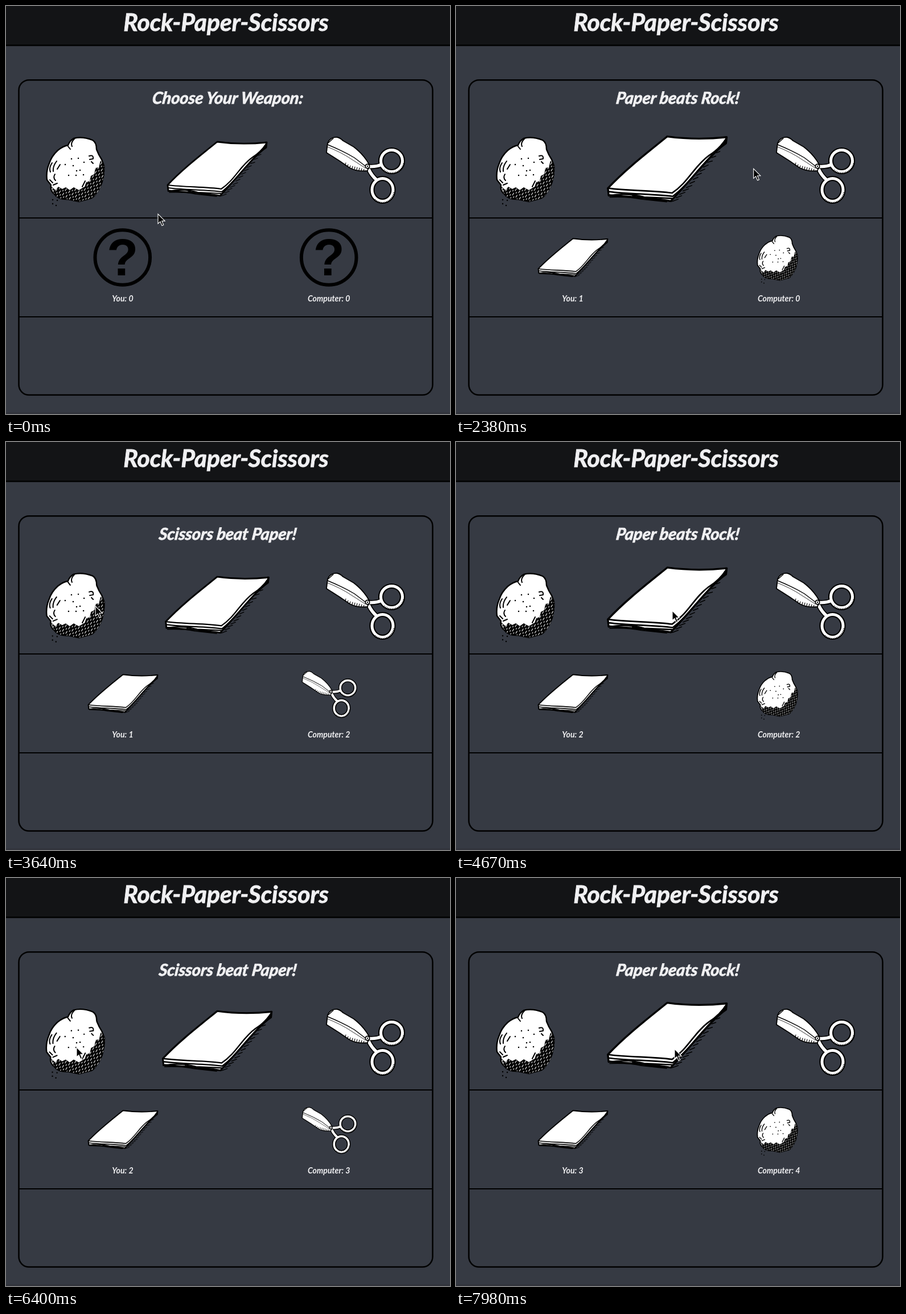
These frames come from a looping animation (780x718 px, 8 s). An HTML page:

```html
<!DOCTYPE html>
<html lang="en">
<head>
<meta charset="utf-8">
<title>Rock-Paper-Scissors</title>
<style>
  html, body { margin: 0; width: 100%; height: 100%; overflow: hidden; background: #363a43; }
  svg { display: block; }
  text { font-family: Lato, sans-serif; font-style: italic; font-weight: 700; fill: #f0f0f2; text-anchor: middle; }
  .heavy { stroke: #f0f0f2; stroke-width: .9; }
  .ink { fill: none; stroke: #000; stroke-linecap: round; stroke-linejoin: round; }
  .body { fill: #fff; stroke: #000; stroke-linejoin: round; }
</style>
</head>
<body>
<svg width="780" height="718" viewBox="0 0 780 718">
  <defs>
    <pattern id="hatch" width="7" height="9" patternUnits="userSpaceOnUse" patternTransform="rotate(32)">
      <path d="M1.5 0v5M5 5v3" stroke="#fff" stroke-width="1.1"/>
    </pattern>

    <!-- Each weapon is drawn around its own centre. -->
    <g id="rock"><g transform="translate(-125.5 -286.5)">
      <path class="body" stroke-width="2.4" d="M119 233Q134 229 152 236Q159 240 159 252Q162 261 168 270L172 281Q173 292 170 305Q167 319 158 330Q153 338 147 339L128 344L109 340Q92 341 85 331Q77 325 79 315L72 306Q70 291 76 277Q80 264 91 254Q101 246 109 245Q112 237 119 233Z"/>
      <path id="shade" d="M166 272L172 281Q174 290 171 303Q167 321 158 331Q153 338 147 339L128 344L109 340Q92 341 85 331L79 317L87 324L92 318L99 322L105 319L112 324L119 319L128 324L138 318L141 310L147 308L149 299L155 296L157 285L163 284Z"/>
      <use href="#shade" fill="url(#hatch)"/>
      <path class="ink" stroke-width="2" d="M120 234Q113 241 116 247M109 247L113 252M81 276Q75 285 78 292M89 273Q82 282 83 291M95 279L90 287M86 296Q82 302 87 307M77 306L82 311M146 264Q154 261 153 269L147 270M150 274L153 277M83 315L90 312M134 318L139 308"/>
      <path class="ink" stroke-width="2.4" d="M115 269h.1M127 268h.1M137 275h.1M104 279h.1M118 281h.1M130 289h.1M124 290h.1M110 298h.1M123 298h.1M136 297h.1M82 341h.1M90 342h.1M82 348h.1M88 351h.1"/>
    </g></g>

    <g id="paper"><g transform="translate(-370 -286.5)">
      <path class="ink" stroke-width="1.3" d="M379 334l8-3M384 329l8-3M389 324l8-3M394 319l8-3M399 314l8-3M404 308l7-3M409 302l7-3M414 296l7-3M419 290l7-3M424 284l7-3M430 277l7-2M436 270l6-2M443 263l5-2"/>
      <path class="body" stroke-width="2.8" d="M371 239C400 243 430 243 458 240L457 249C435 264 414 294 376 334C350 329 315 328 285 325L284 315C310 287 344 261 371 239Z"/>
      <path class="ink" stroke-width="2.2" d="M284 315C315 319 350 318 378 322C402 306 410 283 432 267Q448 257 458 241M285 320C315 324 350 323 379 327C405 307 415 285 457 246M285 326Q312 321 337 328L378 330"/>
      <path class="ink" stroke-width="1.6" d="M287 328Q315 327 333 331L370 335M320 326L350 332L378 334"/>
    </g></g>

    <g id="scissors"><g transform="translate(-630 -286.5)">
      <g fill="none">
        <path stroke="#000" stroke-width="9" d="M636 282Q648 284 659 280M637 287Q642 298 650 305"/>
        <g stroke="#000" stroke-width="9.2"><circle cx="677.5" cy="272.5" r="19"/><ellipse cx="661.5" cy="323.5" rx="18.5" ry="20"/></g>
        <path stroke="#fff" stroke-width="5.5" d="M636 282Q648 284 660 279M637 287Q642 298 651 306"/>
        <g stroke="#fff" stroke-width="5"><circle cx="677.5" cy="272.5" r="19"/><ellipse cx="661.5" cy="323.5" rx="18.5" ry="20"/></g>
        <path stroke="#000" stroke-width="3" stroke-dasharray="1.1 2" d="M699 277A21.5 21.5 0 0 1 663 288M682 328A21 23 0 0 1 647 340"/>
      </g>
      <path class="body" stroke-width="1.8" d="M565 241Q570 230 582 231Q587 232 592 237L611 248Q629 262 638 279L635 290Q618 292 604 285L585 272L563 258Z"/>
      <path class="ink" stroke-width="1.4" d="M565 244Q592 255 612 267L633 283M566 241l9-8"/>
      <path class="ink" stroke-width=".8" d="M565 248Q588 257 606 269L631 285"/>
      <path class="ink" stroke-width="1.1" d="M596 279l1-3M600 282l1-3M604 284l1-3M608 286l1-4M612 287l1-4M616 288l1-4M620 289l1-4M624 290l1-4M628 290l1-3"/>
      <circle class="body" cx="635" cy="282" r="3.7" stroke-width="1.8"/><circle cx="635" cy="282" r="1.2"/>
    </g></g>

    <g id="ask">
      <circle class="ink" r="48.3" stroke-width="6"/>
      <text y="31.5" style="font:700 90px 'Liberation Sans',sans-serif;fill:#000">?</text>
    </g>
  </defs>

  <rect width="780" height="718" fill="#363a43"/>
  <rect width="780" height="68" fill="#131416"/>
  <rect y="68" width="780" height="2.5"/>
  <rect y="715" width="780" height="3" fill="#32343c"/>
  <text class="heavy" x="386.5" y="43.5" font-size="42.7">Rock-Paper-Scissors</text>
  <rect x="22.5" y="130.2" width="727" height="554.4" rx="18" class="ink" stroke-width="2.5"/>
  <path class="ink" stroke-width="2" d="M23 373H749M23 547H749"/>
  <g transform="translate(388.5 172) skewX(-7)"><text id="message" class="heavy" font-size="28.9"></text></g>

  <use id="rockButton" href="#rock"/>
  <use id="paperButton" href="#paper"/>
  <use id="scissorsButton" href="#scissors"/>
  <use id="yourPick"/>
  <use id="theirPick"/>
  <text id="yourScore" x="205" y="519.5" font-size="14.2"></text>
  <text id="theirScore" x="567.3" y="519.5" font-size="14.2"></text>
  <path id="cursor" stroke="#fff" stroke-width="1.1" d="M0 0V17L4 13.4L7 20.5L9.8 19.3L6.8 12.4H12.2Z"/>
</svg>

<script>
const LOOP = 8000, HOVER_MS = 280, LIFT_MS = 95, DROP_MS = 150;

// start time, message, your pick, computer's pick, scores
const rounds = [
  [0, "Choose Your Weapon:", "ask", "ask", 0, 0],
  [1150, "tie!", "rock", "rock", 0, 0],
  [2150, "Paper beats Rock!", "paper", "rock", 1, 0],
  [2820, "Rock beats Scissors!", "scissors", "rock", 1, 1],
  [3240, "Scissors beat Paper!", "paper", "scissors", 1, 2],
  [3960, "tie!", "rock", "rock", 1, 2],
  [4640, "Paper beats Rock!", "paper", "rock", 2, 2],
  [5460, "tie!", "scissors", "scissors", 2, 2],
  [6100, "Scissors beat Paper!", "paper", "scissors", 2, 3],
  [6690, "Paper beats Rock!", "rock", "paper", 2, 4],
  [7510, "Paper beats Rock!", "paper", "rock", 3, 4]
];

const weapons = {
  rock: { x: 125.5, hovers: [[190, 1230], [3610, 4150], [6360, 6830]], presses: [1050, 3860, 6580] },
  paper: {
    x: 370,
    hovers: [[1290, 2370], [3010, 3440], [4220, 4920], [5630, 6260], [6920, 9000]],
    presses: [2060, 3130, 4540, 6000, 7400, 7880]
  },
  scissors: { x: 630, hovers: [[2420, 2950], [4960, 5580]], presses: [2720, 5360] }
};

// departure, arrival, x, y
const moves = [
  [70, 300, 125, 297], [1180, 1430, 365, 281], [2210, 2515, 632, 290],
  [2880, 3130, 370, 295], [3270, 3750, 125, 288], [4080, 4340, 380, 297],
  [4800, 5080, 632, 290], [5500, 5760, 372, 290], [6160, 6400, 124, 298],
  [6780, 7060, 384, 301]
];

const el = id => document.getElementById(id);
const place = (id, x, y, scale = 1) => el(id).setAttribute("transform", `translate(${x} ${y}) scale(${scale})`);

function ease(f) {
  f = Math.min(1, Math.max(0, f));
  return f * f * (3 - 2 * f);
}

function showPick(id, slotX, weapon) {
  el(id).setAttribute("href", "#" + weapon);
  place(id, slotX, 442.5, weapon === "ask" ? 1 : 0.7);
}

function render(t) {
  const [, message, yours, theirs, you, computer] = rounds.findLast(r => r[0] <= t);
  el("message").textContent = message;
  el("yourScore").textContent = `You: ${you}`;
  el("theirScore").textContent = `Computer: ${computer}`;
  showPick("yourPick", 204.8, yours);
  showPick("theirPick", 567.2, theirs);

  for (const [name, { x, hovers, presses }] of Object.entries(weapons)) {
    let scale = 1, lift = 0;
    for (const [on, off] of hovers)
      scale += 0.2 * (ease((t - on) / HOVER_MS) - ease((t - off) / HOVER_MS));
    for (const p of presses)
      lift += 10 * (ease((t - p) / LIFT_MS) - ease((t - p - LIFT_MS) / DROP_MS));
    place(name + "Button", x, 286.5 - lift, scale);
  }

  let cx = 267, cy = 366;
  for (const [from, to, x, y] of moves) {
    const f = ease((t - from) / (to - from));
    cx += (x - cx) * f;
    cy += (y - cy) * f;
  }
  place("cursor", cx, cy);
}

function tick() {
  render(performance.now() % LOOP);
  requestAnimationFrame(tick);
}
tick();
</script>
</body>
</html>
```
